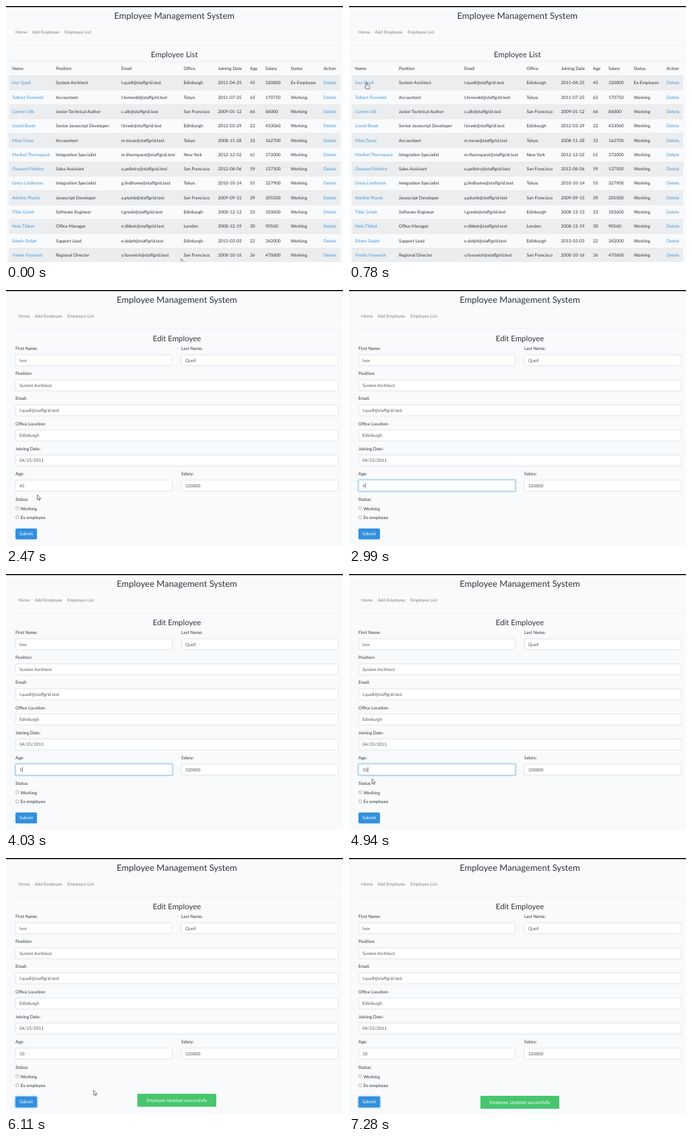
An HTML page for the animation above (7410 ms loop, 500x380 px).

```html
<!DOCTYPE html>
<html lang="en">
<head>
<meta charset="utf-8">
<title>Employee Management System</title>
<style>
html, body { margin: 0; width: 100%; height: 100%; overflow: hidden; background: #f8fafc; }
svg { display: block; width: 500px; height: 380px; }
text { font: 6.5px Lato, "Open Sans", sans-serif; fill: #30353a; text-rendering: geometricPrecision; white-space: pre; }
.h2 { font-size: 13px; }
.h3 { font-size: 11.4px; }
.mid { text-anchor: middle; }
.nav { fill: #7f8385; }
.link { fill: #4295da; }
.value { fill: #50565c; }
.white { fill: #fff; }
.input { fill: #fff; stroke: #ced4da; stroke-width: .6; }
.ring { fill: none; stroke: #3490dc; stroke-opacity: .28; stroke-width: 1.6; }
</style>
</head>
<body>
<svg id="stage" viewBox="0 0 500 380"></svg>
<script>
const LOOP = 7410, STEP = 130;
const stage = document.getElementById('stage');

function add(parent, tag, attrs = {}, content) {
  const el = document.createElementNS('http://www.w3.org/2000/svg', tag);
  for (const key in attrs) el.setAttribute(key, attrs[key]);
  if (content !== undefined) el.textContent = content;
  parent.appendChild(el);
  return el;
}
const group = (parent = stage) => add(parent, 'g');
const text = (parent, x, y, content, cls = '') => add(parent, 'text', { x, y, class: cls }, content);
const rect = (parent, x, y, width, height, attrs) => add(parent, 'rect', { x, y, width, height, ...attrs });
const show = (el, on) => el.setAttribute('visibility', on ? 'inherit' : 'hidden');

function header(page, left, center, title) {
  rect(page, left - 10, 28, 500, 29, { fill: '#f9fbfa' });
  rect(page, left - 10, 57.3, 500, .7, { fill: '#edf0f1' });
  text(page, center, 19.3, 'Employee Management System', 'h2 mid');
  text(page, left, 40.6, 'Home', 'nav');
  text(page, left + 24.4, 40.6, 'Add Employee', 'nav');
  text(page, left + 73, 40.6, 'Employee List', 'nav');
  text(page, center, 75.7, title, 'h3 mid');
}

// Employee list
const list = group();
header(list, 14, 249.8, 'Employee List');
const columns = [9, 74, 171, 263.5, 314.5, 362, 385, 422.5, 471];
const titles = ['Name', 'Position', 'Email', 'Office', 'Joining Date', 'Age', 'Salary', 'Status', 'Action'];
const staff = `Ivor Quell|System Architect|t.quell|Edinburgh|2011-04-25|45|320800
Tolbert Fenwold|Accountant|t.fenwold|Tokyo|2011-07-25|63|170750
Corwin Ulb|Junior Technical Author|c.ulb|San Francisco|2009-01-12|66|86000
Lionel Brask|Senior Javascript Developer|l.brask|Edinburgh|2012-03-29|22|433060
Mina Torue|Accountant|m.torue|Tokyo|2008-11-28|33|162700
Maribel Thornquest|Integration Specialist|m.thornquest|New York|2012-12-02|61|372000
Osmund Pelletry|Sales Assistant|o.pelletry|San Francisco|2012-08-06|59|137500
Greta Lindhome|Integration Specialist|g.lindhome|Tokyo|2010-10-14|55|327900
Adeline Plumb|Javascript Developer|a.plumb|San Francisco|2009-09-15|39|205500
Tilda Greeb|Software Engineer|t.greeb|Edinburgh|2008-12-13|23|103600
Nola Tibbet|Office Manager|n.tibbet|London|2008-12-19|30|90560
Edwin Dolph|Support Lead|e.dolph|Edinburgh|2013-03-03|22|342000
Yvette Fosswick|Regional Director|y.fosswick|San Francisco|2008-10-16|36|470600`
  .split('\n').map(line => line.split('|'));
const mail = user => user + '@staffgrid.test';

rect(list, 4, 82, 492, .5, { fill: '#dee2e6' });
titles.forEach((title, i) => text(list, columns[i], 95.2, title));
staff.forEach((person, row) => {
  const y = 103.6 + row * 21.3;
  if (row % 2 === 0) rect(list, 4, y, 492, 21.3, { fill: '#ebedef' });
  rect(list, 4, y - .3, 492, row ? .5 : .9, { fill: '#dee2e6' });
  const cells = [...person, row ? 'Working' : 'Ex-Employee', 'Delete'];
  cells[2] = mail(cells[2]);
  cells.forEach((cell, i) => text(list, columns[i], y + 12.7, cell, i === 0 || i === 8 ? 'link' : ''));
});

// Edit form
const form = group();
header(form, 18, 253.5, 'Edit Employee');
const blank = group(form), filled = group(form);

function field(label, x, row, width, value) {
  const y = 96.2 + row * 37.2;
  text(form, x, y - 7.2, label);
  const box = rect(form, x + .3, y, width, 16.2, { rx: 1.6, class: 'input' });
  form.appendChild(blank);
  form.appendChild(filled);
  return { box, value: text(filled, x + 6, y + 10.4, value, 'value') };
}
const [first, last] = staff[0][0].split(' ');
field('First Name:', 14, 0, 232.4, first);
field('Last Name:', 260, 0, 232.8, last);
field('Position:', 14, 1, 478.8, staff[0][1]);
field('Email:', 14, 2, 478.8, mail(staff[0][2]));
field('Office Location:', 14, 3, 478.8, staff[0][3]);
field('Joining Date:', 14, 4, 478.8, '04/25/2011');
const age = field('Age:', 14, 5, 232.4, '45');
field('Salary:', 260, 5, 232.8, staff[0][6]);
text(blank, 20, 255.4, 'mm/dd/yyyy', 'value');

text(form, 14, 312.8, 'Status:');
[['Working', 323.8], ['Ex-employee', 337.5]].forEach(([label, y]) => {
  add(form, 'circle', { cx: 16.6, cy: y, r: 2.4, fill: '#f1f1f1', stroke: '#969a9d', 'stroke-width': .6 });
  text(form, 21.5, y + 2.9, label);
});
add(filled, 'circle', { cx: 16.6, cy: 337.5, r: 1.3, fill: '#44484c' });

const ageRing = rect(form, 13.3, 281.2, 234.4, 18.2, { rx: 2.2, class: 'ring' });
const caret = rect(form, 20, 286.5, .6, 8, { fill: '#333' });
const submit = rect(form, 14, 354, 32, 16.2, { rx: 1.7 });
const submitRing = rect(form, 13.2, 353.2, 33.6, 17.8, { rx: 2.3, class: 'ring' });
text(form, 30, 364.3, 'Submit', 'white mid');

const toast = group();
rect(toast, 195, 0, 117, 19.3, { rx: 1, fill: '#47c66e' });
text(toast, 253.5, 11.9, 'Employee Updated successfully', 'white mid');

rect(stage, 0, 0, 500, 1.6, { fill: '#000' });

// Pointer shapes, with the hot spot at 0,0
const pointer = group();
const outline = { fill: '#fff', stroke: '#222', 'stroke-width': .6, 'stroke-linejoin': 'round' };
const shapes = {
  arrow: add(pointer, 'path', { ...outline, d: 'M0 0V7.4L1.7 5.9L2.9 8.5L4 8L2.9 5.5H5.2Z' }),
  hand: add(pointer, 'path', { ...outline, d: 'M-.8 .6Q0-.5 .8 .6V4L3.8 4.8Q4.6 5 4.4 6.3L3.8 10H-.8L-3 6.4Q-2.6 5.2-.8 6.6Z' }),
  beam: add(pointer, 'path', { fill: 'none', stroke: '#333', 'stroke-width': .6, d: 'M-1.3-3.5H1.3M0-3.5V3.5M-1.3 3.5H1.3' })
};

// time, x, y, shape
const path = [
  [0, 260, 375, 'arrow'], [390, 150, 240, 'arrow'], [650, 45, 125, 'arrow'], [780, 26, 113, 'hand'],
  [1300, 26, 113, ''], [1560, 27, 117, 'arrow'], [1950, 38, 220, 'arrow'], [2340, 49, 300, 'arrow'],
  [2470, 46.5, 304, 'arrow'], [2730, 30, 291, 'beam'], [2860, 30, 291, ''],
  [4810, 32, 294, 'beam'], [4940, 34, 304, 'arrow'], [5330, 42, 352, 'arrow'], [5460, 43, 356.5, 'hand'],
  [5850, 54, 356, 'arrow'], [5980, 82, 350, 'arrow'], [6110, 130, 344.5, 'arrow'],
  [6500, 440, 338, 'arrow'], [6630, 482, 335, 'arrow'], [6760, 482, 335, '']
];
const ages = [[0, '45'], [2990, '4'], [3120, ''], [4030, '5'], [4160, '50']];
const toastSteps = [[5980, 354.5, .5], [6110, 350, 1], [6240, 352, 1], [6370, 353, 1]];
const latest = (table, t) => table.filter(step => step[0] <= t).pop();

function movePointer(t) {
  const from = latest(path, t);
  const to = path[path.indexOf(from) + 1] || from;
  const k = to === from ? 0 : (t - from[0]) / (to[0] - from[0]);
  const mix = i => from[i] + (to[i] - from[i]) * k;
  pointer.setAttribute('transform', `translate(${mix(1)} ${mix(2)})`);
  for (const name in shapes) show(shapes[name], name === from[3]);
}

function render(now) {
  const t = Math.floor(now % LOOP / STEP) * STEP;
  const editing = t >= 1300;
  show(list, !editing);
  show(form, editing);
  show(blank, editing && t < 1560);
  show(filled, t >= 1560);

  const focused = t >= 2860 && t < 5460;
  const value = latest(ages, t)[1];
  age.value.textContent = value;
  age.box.style.stroke = focused ? '#8fc1ea' : '';
  show(ageRing, focused);
  show(caret, focused);
  caret.setAttribute('x', 20.2 + value.length * 3.77);

  const pressed = t >= 5460 && t < 5850;
  submit.setAttribute('fill', pressed ? '#2779bd' : '#3490dc');
  show(submitRing, t >= 5460);

  const slide = latest(toastSteps, t);
  show(toast, slide);
  if (slide) {
    toast.setAttribute('transform', `translate(0 ${slide[1]})`);
    toast.setAttribute('opacity', slide[2]);
  }
  movePointer(t);
}

const start = performance.now();
function tick() {
  render(performance.now() - start);
  requestAnimationFrame(tick);
}
tick();
</script>
</body>
</html>
```
